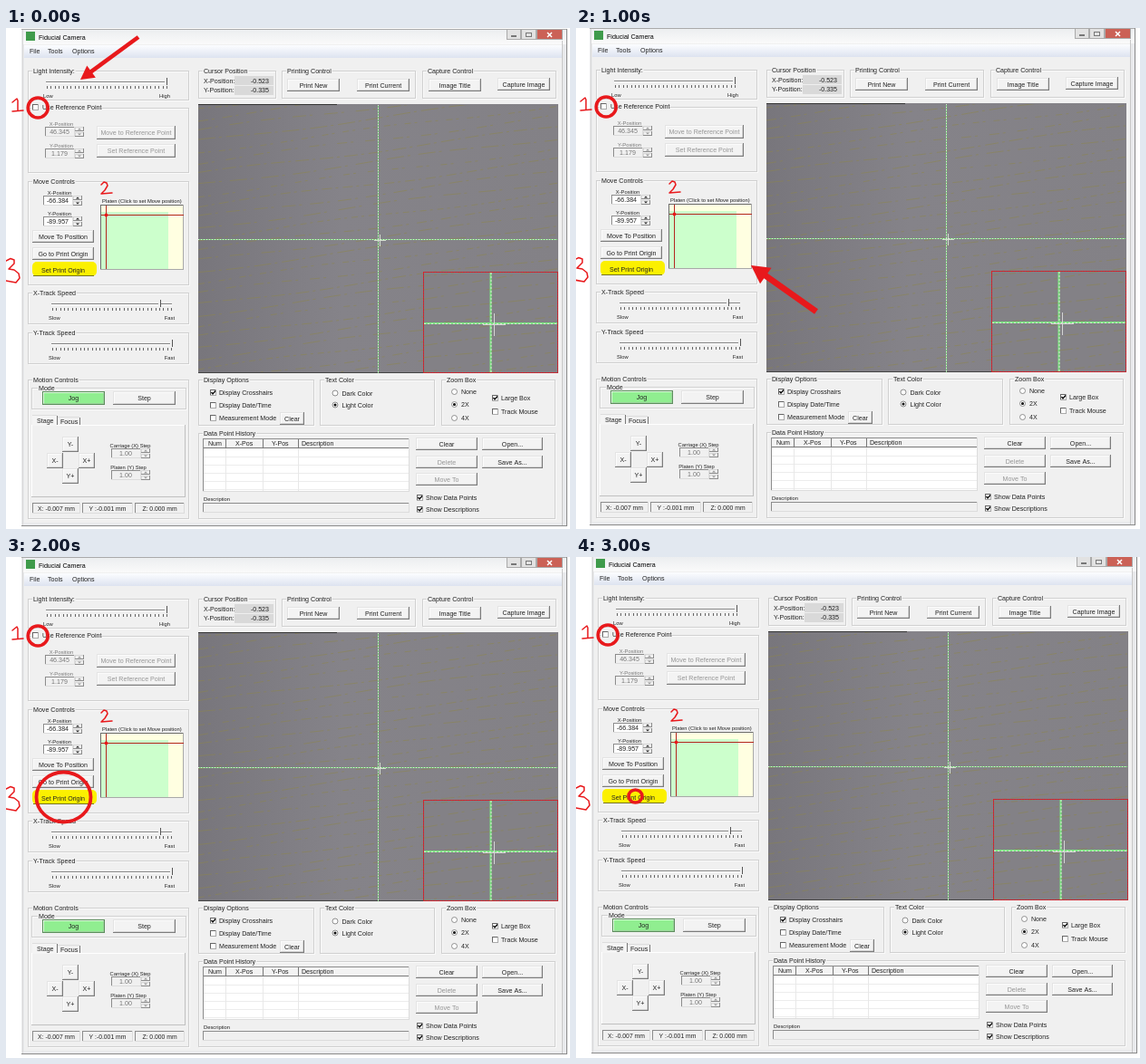
An HTML page with a canvas that plays this animation: 622x553 px, repeating every 3500 ms.

```html
<!DOCTYPE html>
<html lang="en">
<head>
<meta charset="utf-8">
<title>Fiducial Camera</title>
<style>
html, body { margin: 0; width: 100%; height: 100%; overflow: hidden; background: #fff; }
canvas { display: block; }
</style>
</head>
<body>
<canvas id="stage" width="622" height="553"></canvas>
<script>
const ctx = document.getElementById('stage').getContext('2d');
const RED = '#e8191c', INK = '#222', DIM = '#969696', PANEL = '#f0f0f0';
const SMALL = 5.8, NORMAL = 7.1;

function rect(x, y, w, h, color) {
  ctx.fillStyle = color;
  ctx.fillRect(x, y, w, h);
}

function frame(x, y, w, h, light, dark = light) {
  rect(x, y, w, 1, light);
  rect(x, y, 1, h, light);
  rect(x, y + h - 1, w, 1, dark);
  rect(x + w - 1, y, 1, h, dark);
}

function text(str, x, y, { size = NORMAL, color = INK, align = 'left' } = {}) {
  ctx.font = `${size}px "Liberation Sans", Arial, sans-serif`;
  ctx.fillStyle = color;
  ctx.textAlign = align;
  ctx.fillText(str, x, y);
}

function line(points, color, width = 1, dash = []) {
  ctx.beginPath();
  points.forEach(([x, y]) => ctx.lineTo(x, y));
  ctx.strokeStyle = color;
  ctx.lineWidth = width;
  ctx.setLineDash(dash);
  ctx.stroke();
  ctx.setLineDash([]);
}

function group(label, x, y, right, bottom, labelX = x + 6) {
  frame(x + 1, y + 1, right - x, bottom - y, '#fafafa');
  frame(x, y, right - x, bottom - y, '#d0d0d0');
  if (!label) return;
  ctx.font = `${NORMAL}px "Liberation Sans", Arial, sans-serif`;
  rect(labelX - 1, y - 1, ctx.measureText(label).width + 2, 3, PANEL);
  text(label, labelX, y + 3);
}

function button(label, x, y, w, { h = 14, dim = false, fill = '#f3f3f3' } = {}) {
  rect(x, y, w, h, fill);
  frame(x, y, w, h, '#e4e4e4', '#7c7c7c');
  frame(x + 1, y + 1, w - 2, h - 2, 'rgba(255,255,255,.7)', 'rgba(170,170,170,.4)');
  text(label, x + w / 2, y + h / 2 + 2.6, { color: dim ? DIM : INK, align: 'center' });
}

function sunken(x, y, w, h, fill) {
  rect(x, y, w, h, fill);
  frame(x, y, w, h, '#8c8c8c', '#dcdcdc');
}

function spinner(label, value, x, y, { dim = false, labelX = x + 18, labelColor = INK } = {}) {
  const color = dim ? DIM : INK;
  text(label, labelX, y - 1.5, { size: SMALL, color: labelColor, align: 'center' });
  sunken(x, y, 33, 11, dim ? PANEL : '#fff');
  text(value, x + 16, y + 8, { color: dim ? '#777' : INK, align: 'center' });
  for (const [dy, dir] of [[0, -1], [6, 1]]) {
    rect(x + 33, y + dy, 10, 5, PANEL);
    frame(x + 33, y + dy, 10, 5, '#d5d5d5', '#8c8c8c');
    const cy = y + dy + 2.5;
    ctx.beginPath();
    ctx.moveTo(x + 36, cy - dir);
    ctx.lineTo(x + 40, cy - dir);
    ctx.lineTo(x + 38, cy + dir);
    ctx.fillStyle = color;
    ctx.fill();
  }
}

function checkbox(label, x, y, checked, gap = 10) {
  rect(x, y, 7, 7, '#fff');
  frame(x, y, 7, 7, '#666', '#aaa');
  if (checked) line([[x + 1.5, y + 3], [x + 3, y + 5], [x + 6, y + 1.5]], '#000', 1.3);
  text(label, x + gap, y + 6);
}

function radio(label, x, y, on) {
  ctx.beginPath();
  ctx.arc(x, y, 3, 0, 7);
  ctx.fillStyle = '#fff';
  ctx.fill();
  ctx.strokeStyle = '#777';
  ctx.lineWidth = .8;
  ctx.stroke();
  if (on) {
    ctx.beginPath();
    ctx.arc(x, y, 1.5, 0, 7);
    ctx.fillStyle = '#000';
    ctx.fill();
  }
  text(label, x + 7.5, y + 2.7);
}

function slider(x, right, y, thumb, low, high) {
  rect(x, y, right - x, 1, '#858585');
  rect(x, y + 1, right - x, 1, '#fff');
  for (let i = 0; i <= 30; i++) rect(Math.round(x + 1 + i * (right - x - 2) / 30), y + 5, 1, 3, '#666');
  rect(thumb - 1, y - 4, 3, 9, PANEL);
  rect(thumb + 1, y - 4, 1, 8, '#555');
  text(low, x - 3, y + 17.5, { size: SMALL });
  text(high, right + 3, y + 17.5, { size: SMALL, align: 'right' });
}

function windowFrame() {
  rect(17, 1, 602, 549, '#e9eaec');
  rect(20, 18, 593, 528, PANEL);
  const bar = ctx.createLinearGradient(0, 2, 0, 18);
  bar.addColorStop(0, '#eceef0');
  bar.addColorStop(1, '#fafafa');
  rect(18, 2, 600, 16, bar);
  rect(17, 1, 602, 1, '#aaa');
  rect(18, 2, 1, 547, '#d8d8d8');
  rect(613, 14, 1, 535, '#c8c8c8');
  rect(618, 1, 1, 549, '#888');
  rect(17, 549, 602, 1, '#8a8a8a');
  rect(22, 4, 10, 10, '#3f9b4b');
  text('Fiducial Camera', 36, 13, { color: '#000' });

  for (const [x, w, color] of [[552, 16, '#e2e2e2'], [568, 17, '#e2e2e2'], [585, 29, '#cb6156']]) {
    rect(x, 1, w, 12, color);
    frame(x, 1, w, 12, '#aaa');
  }
  rect(557, 8, 6, 2, '#777');
  frame(573, 5, 7, 5, '#777');
  line([[597, 5], [602, 10]], '#fff', 1.5);
  line([[602, 5], [597, 10]], '#fff', 1.5);

  const menu = ctx.createLinearGradient(0, 19, 0, 33);
  menu.addColorStop(0, '#fcfdff');
  menu.addColorStop(1, '#dde3f0');
  rect(20, 19, 593, 14, menu);
  text('File', 26, 28);
  text('Tools', 46, 28);
  text('Options', 73, 28);
}

function leftColumn() {
  const inactive = { dim: true, labelColor: '#777' };
  group('Light Intensity:', 24, 47, 202, 80);
  slider(44, 178, 59, 176, 'Low', 'High');

  group('', 24, 88, 202, 160);
  rect(28, 84, 77, 9, PANEL);
  checkbox('Use Reference Point', 29, 84, false, 11);
  spinner('X-Position', '46.345', 43, 109, inactive);
  spinner('Y-Position', '1.179', 43, 133, inactive);
  button('Move to Reference Point', 100, 108, 87, { dim: true, h: 15 });
  button('Set Reference Point', 100, 128, 87, { dim: true, h: 15 });

  group('Move Controls', 24, 169, 202, 284);
  spinner('X-Position', '-66.384', 41, 185);
  spinner('Y-Position', '-89.957', 41, 208);
  button('Move To Position', 29, 223, 68);
  button('Go to Print Origin', 29, 242, 68);
  ctx.beginPath();
  ctx.roundRect(29, 258, 71, 16, 5);
  ctx.fillStyle = '#fbf000';
  ctx.fill();
  rect(30, 273, 67, 1, '#77751c');
  text('Set Print Origin', 63, 269.6, { align: 'center' });

  text('Platen (Click to set Move position)', 106, 192.5, { size: SMALL });
  rect(104, 195, 92, 72, '#ffffe1');
  rect(105, 203, 74, 63, '#ccffcc');
  frame(104, 195, 92, 72, '#6b6b6b', '#a8a8a8');
  rect(105, 206, 91, 1, '#b3261e');
  rect(110, 196, 1, 70, '#b3261e');
  ctx.beginPath();
  ctx.arc(110.5, 206.5, 2, 0, 7);
  ctx.fillStyle = RED;
  ctx.fill();

  group('X-Track Speed', 24, 292, 202, 327);
  slider(50, 183, 304, 169, 'Slow', 'Fast');
  group('Y-Track Speed', 24, 336, 202, 371);
  slider(50, 183, 348, 182, 'Slow', 'Fast');
}

function motionControls() {
  group('Motion Controls', 24, 388, 202, 542);
  group('Mode', 28, 397, 199, 421, 36);
  button('Jog', 40, 401, 69, { h: 15, fill: '#90ee90' });
  frame(40, 401, 69, 15, '#5d8f5d');
  button('Step', 118, 401, 69, { h: 15 });

  frame(28, 438, 170, 80, '#fff', '#c0c0c0');
  rect(29, 427, 27, 12, '#f4f4f4');
  rect(29, 427, 27, 1, '#ddd');
  rect(56, 428, 1, 10, '#777');
  rect(57, 429, 24, 1, '#ddd');
  rect(81, 430, 1, 8, '#777');
  text('Stage', 34, 436);
  text('Focus', 60, 436.5);
  for (const [label, x, y] of [['Y-', 62, 451], ['X-', 45, 469], ['X+', 80, 469], ['Y+', 62, 486]])
    button(label, x, y, 18, { h: 17 });
  spinner('Carriage (X) Step', '1.00', 116, 464, { dim: true, labelX: 137 });
  spinner('Platen (Y) Step', '1.00', 116, 488, { dim: true, labelX: 135 });

  for (const [label, x, w] of [['X: -0.007 mm', 29, 53], ['Y :-0.001 mm', 84, 56], ['Z: 0.000 mm', 142, 55]]) {
    sunken(x, 524, w, 12, PANEL);
    text(label, x + w / 2, 532.6, { size: 6.8, align: 'center' });
  }
}

function topRow() {
  group('Cursor Position', 212, 47, 298, 78);
  rect(252, 53, 43, 21, '#d9d9d9');
  rect(252, 63, 43, 1, '#eee');
  text('X-Position:', 218, 61);
  text('-0.523', 290, 61, { align: 'right' });
  text('Y-Position:', 218, 71);
  text('-0.335', 290, 71, { align: 'right' });

  group('Printing Control', 304, 47, 452, 78);
  button('Print New', 310, 56, 58);
  button('Print Current', 387, 56, 58);
  group('Capture Control', 459, 47, 607, 78);
  button('Image Title', 466, 56, 58);
  button('Capture Image', 542, 55, 58);
}

// Faint grain: short olive dashes along gently rising waves.
function wood(x, y, w, h, gap, slope) {
  ctx.save();
  ctx.beginPath();
  ctx.rect(x, y, w, h);
  ctx.clip();
  for (let i = 0; i < (h + w * slope) / gap; i++) {
    const points = [];
    for (let dx = 0; dx <= w; dx += 6)
      points.push([x + dx, y + i * gap - slope * (dx - 30) + 2 * Math.sin(dx / 47 + i * 1.7)]);
    line(points, 'rgba(140,134,78,.55)', 1, [7 + i % 4 * 4, 4, 3, 5 + i % 3 * 4]);
  }
  ctx.restore();
}

function cross(x, y, r, color) {
  rect(x - r, y, 2 * r + 1, 1, color);
  rect(x, y - r, 1, 2 * r + 1, color);
}

function camera() {
  const shade = ctx.createLinearGradient(212, 0, 608, 0);
  shade.addColorStop(0, '#78767c');
  shade.addColorStop(.4, '#858389');
  shade.addColorStop(1, '#838186');
  rect(212, 84, 397, 297, shade);
  wood(212, 85, 396, 295, 12, .13);
  rect(212, 84, 153, 1, '#333');
  rect(212, 380, 248, 1, '#444');
  line([[410.5, 85], [410.5, 381]], '#7fd880');
  line([[410.5, 85], [410.5, 381]], '#dcecd8', 1, [1, 2]);
  line([[212, 233.5], [608, 233.5]], '#7fd880');
  line([[212, 233.5], [608, 233.5]], '#dcecd8', 1, [1, 2]);
  cross(412, 234, 6, '#d4dcd0');

  rect(460, 269, 149, 112, '#838186');
  wood(461, 270, 147, 110, 13, .13);
  line([[534.5, 270], [534.5, 381]], '#7ce481', 2);
  line([[535, 270], [535, 381]], '#d8e8d4', 1, [2, 2]);
  line([[461, 326], [608, 326]], '#7ce481', 2);
  line([[461, 326.5], [608, 326.5]], '#d8e8d4', 1, [2, 2]);
  cross(538, 327, 12, '#d4d4d4');
  frame(460, 269, 149, 112, '#8a4247');
  ctx.strokeStyle = '#e31e2a';
  ctx.lineWidth = 1;
  ctx.setLineDash([2, 1]);
  ctx.strokeRect(460.5, 269.5, 148, 111);
  ctx.setLineDash([]);
}

function optionsRow() {
  group('Display Options', 212, 388, 340, 439);
  checkbox('Display Crosshairs', 225, 399, true);
  checkbox('Display Date/Time', 225, 413, false);
  checkbox('Measurement Mode', 225, 427, false);
  button('Clear', 302, 424, 27);

  group('Text Color', 346, 388, 473, 439);
  radio('Dark Color', 363, 403);
  radio('Light Color', 363, 416, true);

  group('Zoom Box', 480, 388, 606, 439);
  radio('None', 494.5, 401.5);
  radio('2X', 494.5, 415.5, true);
  radio('4X', 494.5, 430.5);
  checkbox('Large Box', 536, 405, true);
  checkbox('Track Mouse', 536, 420, false);
}

function history() {
  group('Data Point History', 212, 447, 606, 542);
  sunken(217, 453, 228, 59, '#fff');
  rect(218, 454, 226, 10, '#f3f3f3');
  rect(218, 463, 226, 1, '#777');
  for (let y = 473; y < 511; y += 9) rect(218, y, 226, 1, '#ececec');
  for (const x of [242, 283, 322]) {
    rect(x, 454, 1, 57, '#e8e8e8');
    rect(x, 454, 1, 10, '#777');
  }
  text('Num', 223, 461);
  text('X-Pos', 253, 461);
  text('Y-Pos', 293, 461);
  text('Description', 326, 461);
  text('Description', 218, 522, { size: SMALL });
  sunken(217, 524, 228, 11, PANEL);

  button('Clear', 452, 452, 68);
  button('Open...', 525, 452, 67);
  button('Delete', 452, 472, 68, { dim: true });
  button('Save As...', 525, 472, 67);
  button('Move To', 452, 491, 68, { dim: true });
  checkbox('Show Data Points', 453, 515, true);
  checkbox('Show Descriptions', 453, 528, true);
}

function ring(x, y, rx, ry, width) {
  ctx.beginPath();
  ctx.ellipse(x, y, rx, ry, 0, 0, 7);
  ctx.strokeStyle = RED;
  ctx.lineWidth = width;
  ctx.stroke();
}

function arrow(x1, y1, x2, y2, width, head) {
  const length = Math.hypot(x2 - x1, y2 - y1), wing = head * .54;
  ctx.save();
  ctx.translate(x2, y2);
  ctx.rotate(Math.atan2(y2 - y1, x2 - x1));
  rect(-length, -width / 2, length - head + 1, width, RED);
  ctx.beginPath();
  ctx.moveTo(0, 0);
  ctx.lineTo(-head, -wing);
  ctx.lineTo(-head, wing);
  ctx.fillStyle = RED;
  ctx.fill();
  ctx.restore();
}

function handwriting() {
  const pen = points => line(points, RED, 1.5);
  ctx.lineJoin = ctx.lineCap = 'round';
  pen([[7, 82], [12, 78], [13, 80], [13, 91]]);
  pen([[7, 92], [19, 91]]);
  pen([[105, 173], [108, 170], [111, 171], [112, 174], [109, 179], [105, 183], [117, 182]]);
  pen([[0, 257], [5, 254.5], [9, 256], [9, 260], [3, 266], [9, 267], [14, 271], [15, 276], [11, 281], [0, 279]]);
  ctx.lineCap = 'butt';
  ring(35.2, 88, 11, 11, 3.6);
}

// Each step: screenshot offset and the pointer drawn over it.
const steps = [
  [0, 0, () => arrow(146, 10, 82, 57, 4.6, 15)],
  [-1, 0, () => arrow(128, 38, 33, 89, 6.8, 20)],
  [-2, -1, () => arrow(265, 313, 193, 262, 6.8, 20)],
  [-2, -1, () => arrow(182, 258, 108, 206, 6.8, 20)],
  [0, -1, () => ring(63.5, 265, 30, 27.5, 3.8)],
  [1, -2, () => ring(65.5, 265, 16, 15, 3.8)],
  [0, -2, () => ring(65.5, 264, 7.5, 7, 3.6)]
];

const scene = [windowFrame, leftColumn, motionControls, topRow, camera, optionsRow, history, handwriting];
let shown = -1;

function tick() {
  const index = Math.floor(performance.now() % 3500 / 500);
  if (index !== shown) {
    shown = index;
    const [dx, dy, pointer] = steps[index];
    rect(0, 0, 622, 553, '#fff');
    ctx.save();
    ctx.translate(dx, dy);
    scene.forEach(part => part());
    ctx.restore();
    pointer();
  }
  requestAnimationFrame(tick);
}
tick();
</script>
</body>
</html>
```
